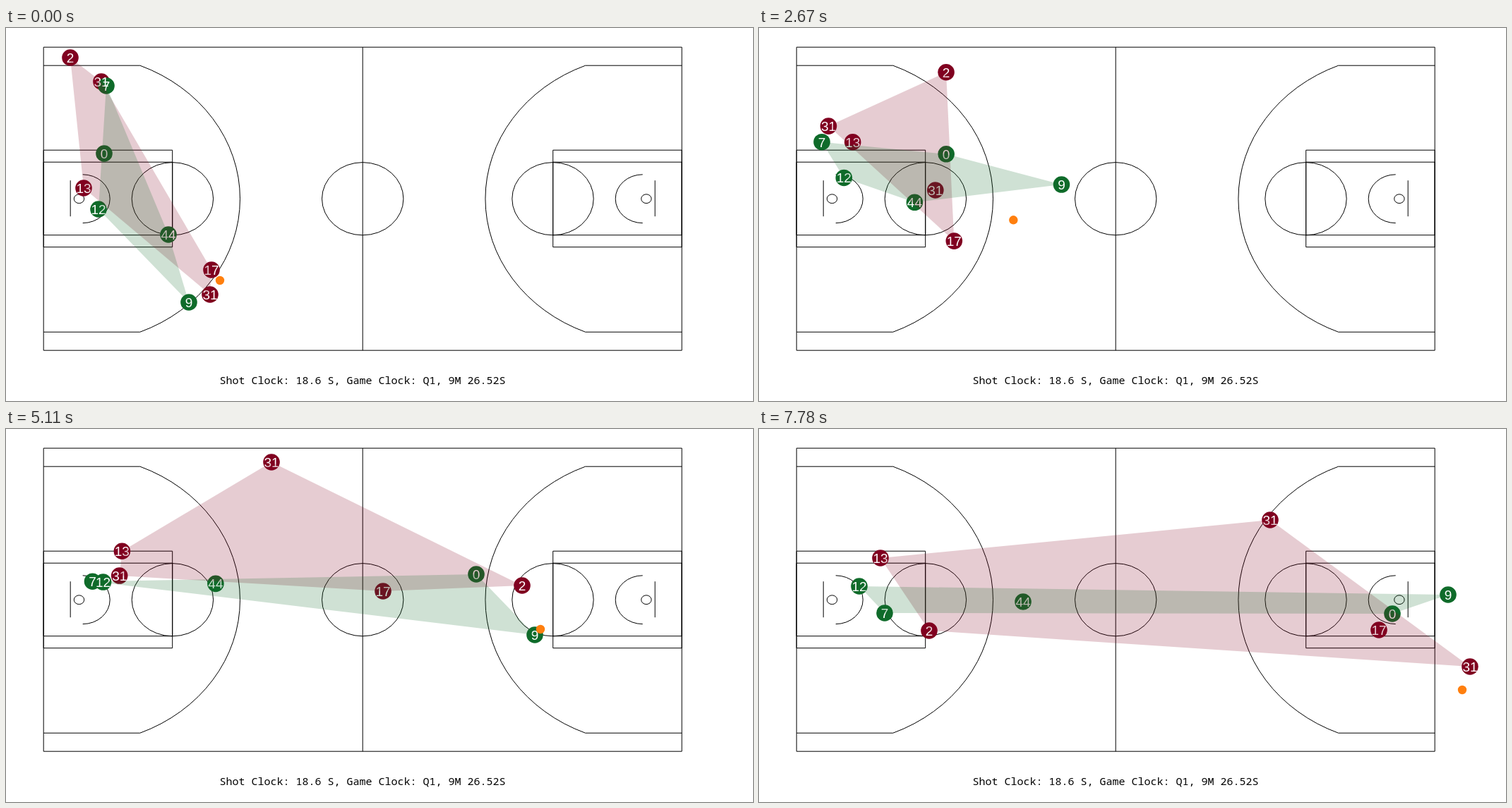
Animation of 1058 by 529 pixels, one loop 8 s. Source, as an HTML page:

```html
<!DOCTYPE html>
<html lang="en">
<head>
<meta charset="utf-8">
<title>Court tracking</title>
<style>
  html, body { margin: 0; width: 100%; height: 100%; overflow: hidden; background: #fff; }
  svg { display: block; width: 100vw; height: 100vh; }
  .line { fill: none; stroke: #000; stroke-width: 1; }
  .num { font: 19px "Liberation Sans", Arial, sans-serif; fill: #fff; text-anchor: middle; }
  .clock { font: 15px "Noto Sans Mono", monospace; text-anchor: middle; }
</style>
</head>
<body>
<svg viewBox="0 0 1058 529">
  <g class="line" transform="translate(.2 .2)">
    <path d="M53 27H957V457H53ZM505 27V457"/>
    <ellipse cx="505" cy="242" rx="57.7" ry="51.6"/>
    <g id="half">
      <path d="M53 53H189.6A228.4 204.3 0 0 1 189.6 431H53"/>
      <path d="M53 173H235.5V310.5H53ZM53 190H235.5V293.5H53Z"/>
      <ellipse cx="235.7" cy="242" rx="57.7" ry="51.6"/>
      <path d="M108.5 207.6A38.5 34.4 0 0 1 108.5 276.4M91 216V267"/>
      <ellipse cx="103.3" cy="242" rx="7.2" ry="6.4"/>
    </g>
    <use href="#half" transform="translate(1010) scale(-1 1)"/>
  </g>
  <g id="discs"></g>
  <g id="numbers" class="num"></g>
  <g id="hulls" fill-opacity=".2"></g>
  <circle id="ball" r="6.2" fill="#ff7f0e"/>
  <text class="clock" x="505" y="505">Shot Clock: 18.6 S, Game Clock: Q1, 9M 26.52S</text>
</svg>
<script>
const LOOP = 8000, STEPS = 36;
// Steps at which the key points of a path are reached.
const SLOW = [0, 8, 15, 35], FAST = [0, 8, 15, 23, 28, 35];
const byId = id => document.getElementById(id);

function set(el, attrs) {
  for (const name in attrs) el.setAttribute(name, attrs[name]);
}
function add(parent, tag, attrs) {
  const el = document.createElementNS('http://www.w3.org/2000/svg', tag);
  set(el, attrs);
  return byId(parent).appendChild(el);
}

// Smooth path through key points: position at step k.
function path(keys, ...points) {
  const last = keys.length - 1;
  const slope = (i, axis) => {
    const a = Math.max(i - 1, 0), b = Math.min(i + 1, last);
    return (points[b][axis] - points[a][axis]) / (keys[b] - keys[a]);
  };
  return k => {
    let i = 0;
    while (i < last - 1 && k >= keys[i + 1]) i++;
    const h = keys[i + 1] - keys[i], u = (k - keys[i]) / h, v = 1 - u;
    return [0, 1].map(axis =>
      v * v * (1 + 2 * u) * points[i][axis] + u * u * (3 - 2 * u) * points[i + 1][axis]
      + h * u * v * (v * slope(i, axis) - u * slope(i + 1, axis)));
  };
}

// Three red players trade labels now and then.
const swap = (usual, brief, late) => k =>
  k >= 30 ? late : Math.abs(k % 12 - 8) < 3 ? brief : usual;

const teams = [
  { color: '#800020', players: [
    [13, path(SLOW, [110, 227], [104, 163], [152, 167], [172, 183])],
    [17, path(FAST, [291, 343], [285, 352], [297, 263], [534, 230], [719, 234], [878, 285])],
    [swap(31, 22, 2), path(SLOW, [135, 76], [94, 117], [112, 157], [241, 286])],
    [swap(2, 22, 31), path(FAST, [91, 42], [160, 40], [372, 93], [731, 222], [935, 298], [1007, 337])],
    [swap(31, 2, 31), path(FAST, [289, 378], [316, 304], [219, 171], [376, 47], [529, 59], [724, 129])]
  ] },
  { color: '#0f6b2a', players: [
    [7, path(SLOW, [142, 82], [98, 130], [92, 182], [178, 261])],
    [0, path(FAST, [139, 178], [169, 168], [363, 189], [666, 206], [806, 233], [897, 262])],
    [12, path(SLOW, [131, 257], [107, 216], [131, 214], [142, 223])],
    [44, path(SLOW, [230, 293], [197, 297], [245, 218], [374, 245])],
    [9, path(FAST, [259, 389], [351, 267], [502, 210], [749, 292], [888, 264], [976, 235])]
  ] }
];
const ballAt = path(FAST, [303, 358], [284, 285], [449, 271], [757, 284], [931, 314], [996, 370]);

for (const team of teams) {
  team.hull = add('hulls', 'polygon', { fill: team.color });
  team.players = team.players.map(([label, at]) => ({
    label, at,
    disc: add('discs', 'circle', { r: 11.8, fill: team.color }),
    text: add('numbers', 'text', {})
  }));
}

function convexHull(points) {
  const chain = list => {
    const out = [];
    for (const p of list) {
      while (out.length > 1) {
        const [a, b] = out.slice(-2);
        if ((b[0] - a[0]) * (p[1] - a[1]) > (b[1] - a[1]) * (p[0] - a[0])) break;
        out.pop();
      }
      out.push(p);
    }
    return out.slice(0, -1);
  };
  const sorted = [...points].sort((a, b) => a[0] - b[0] || a[1] - b[1]);
  return [...chain(sorted), ...chain([...sorted].reverse())];
}

function draw(k) {
  for (const { players, hull } of teams) {
    const spots = players.map(({ label, at, disc, text }) => {
      const [x, y] = at(k);
      set(disc, { cx: x, cy: y });
      set(text, { x, y: y + 7 });
      text.textContent = typeof label === 'function' ? label(k) : label;
      return [x, y];
    });
    set(hull, { points: convexHull(spots).join(' ') });
  }
  const [cx, cy] = ballAt(k);
  set(byId('ball'), { cx, cy });
}

let start, shown = -1;
function tick(now) {
  start ??= now;
  // Steps land on whole hundredths of a second, slightly early.
  const k = Math.floor(((now - start) % LOOP + 10) / LOOP * STEPS) % STEPS;
  if (k !== shown) draw(shown = k);
  requestAnimationFrame(tick);
}
draw(0);
requestAnimationFrame(tick);
</script>
</body>
</html>
```
